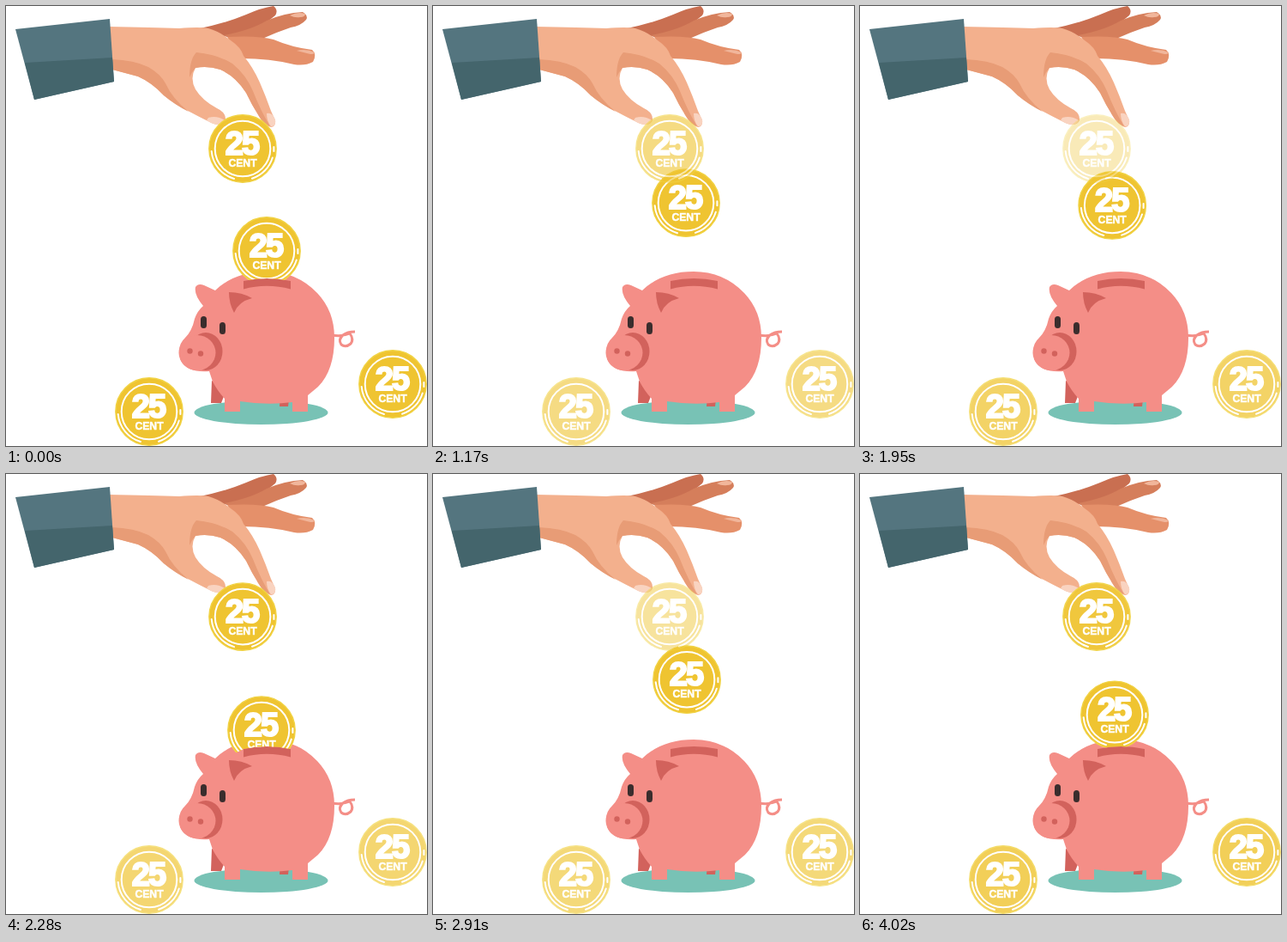
Write an HTML page that moves like this. It is 491 px wide and 512 px high and loops after 4050 ms.

```html
<!DOCTYPE html>
<html lang="en">
<head>
<meta charset="utf-8">
<title>Piggy bank savings</title>
<style>
  html, body { margin: 0; width: 100%; height: 100%; overflow: hidden; background: #fff; }
  svg { display: block; width: 491px; height: 512px; }
  text { font-family: "Liberation Sans", Arial, sans-serif; font-weight: bold; text-anchor: middle; fill: #fff; stroke: #fff; }
  .num { font-size: 38px; letter-spacing: -2px; stroke-width: 2.2px; }
  .unit { font-size: 12.2px; stroke-width: .5px; }
  .pink { fill: #f48e87; }
  .rose { fill: #d2625c; }
</style>
</head>
<body>
<svg viewBox="0 0 491 512">
  <defs>
    <g id="coin">
      <circle r="39.2" fill="#efc431" stroke="#f1d344" stroke-width="1.4"/>
      <g fill="none" stroke="#fff" stroke-width="2">
        <circle r="32.3"/>
        <path d="M-36.3 3A36.4 36.4 0 0 0 -10 35M11 34.7A36.4 36.4 0 0 0 34.8 10.5M36.4 3V-2" stroke-linecap="round"/>
      </g>
      <text class="num" x="-1" y="7">25</text>
      <text class="unit" y="20.8">CENT</text>
    </g>
    <clipPath id="aboveSlot">
      <path d="M0 0H491V330H345L332 320Q304 314 277 320L257 330H0Z"/>
    </clipPath>
  </defs>

  <!-- hand -->
  <path fill="#c96f51" d="M226 26Q256 20 280 10Q298 2 312 0Q318 5 314 11Q306 18 296 24L258 36Z"/>
  <path fill="#d57e5b" d="M254 34Q286 28 304 17Q325 8 346 7Q353 11 350 16Q344 23 332 25Q314 31 299 38L276 42Z"/>
  <path fill="#e5906a" d="M258 36Q294 34 312 39Q333 48 357 51Q363 56 358 65Q349 70 336 68Q308 61 274 61Z"/>
  <path fill="#f1b69b" d="M331 11Q340 6 349 9Q349 13 343 13Q337 14 331 11ZM339 52Q350 49 360 54Q360 56 355 56Z"/>
  <path fill="#f3b08d" d="M119 24Q172 25 202 26Q226 24 236 26Q250 30 262 40Q274 48 277 58Q288 71 296 89Q303 105 309 122L314 133Q315 140 309 141Q302 139 296 130Q287 116 280 101Q268 82 250 74Q235 69 221 72Q214 84 221 97Q229 110 246 119Q257 124 256 133Q253 140 242 137Q231 132 216 124Q197 115 184 104Q170 89 154 82L124 74Z"/>
  <path fill="#e89c76" d="M123 62Q150 63 166 71Q180 79 186 90Q194 108 213 123Q197 115 184 104Q170 89 154 82L124 74Z"/>
  <path fill="#e89c76" d="M214 83Q214 62 222 54Q246 56 264 67Q280 80 288 99Q297 122 308 140Q300 137 295 128Q286 114 280 101Q268 82 250 74Q235 69 221 72Q217 76 214 83Z"/>
  <path fill="#f9d3c0" d="M236 130Q246 127 255 133Q254 139 245 138Q239 137 234 133ZM304 125Q310 123 314 132Q315 141 309 140Q304 134 304 125Z"/>
  <path fill="#54757f" d="M11 27L121 15L126 88L33 109Z"/>
  <path fill="#44656c" d="M22 66L124 60L126 88L33 109Z"/>

  <!-- pig -->
  <ellipse cx="297.5" cy="473" rx="78" ry="14" fill="#78c2b5"/>
  <path class="rose" d="M240 436L258 444L251 462H239ZM320 450H331L329 466H319Z"/>
  <path fill="none" stroke="#f48e87" stroke-width="3" d="M380 383Q392 385 401 381Q406 388 402 393Q396 398 391 394Q387 388 393 383Q398 379 407 379"/>
  <path class="pink" d="M244 331Q267 309 304 309Q339 309 363 334Q383 355 383 386Q383 424 364 443L352 453V472H334V461Q305 465 273 460V472H255V457Q246 447 241 437Q239 431 237 425Q212 427 204 413Q198 396 209 386Q217 378 220 364Q223 355 230 349Q219 336 221 327Q224 322 231 325Z"/>
  <ellipse class="rose" cx="233" cy="402" rx="19.5" ry="22"/>
  <ellipse class="pink" cx="223" cy="403.5" rx="21.5" ry="20.5"/>
  <g class="rose">
    <circle cx="214.5" cy="401.5" r="3.2"/><circle cx="227" cy="404.5" r="3.2"/>
    <path d="M260 333Q275 333 287 340Q271 344 266 357Q260 346 260 333Z"/>
    <path d="M277 320Q304 314 332 320V329.5Q304 322 277 329.5Z"/>
  </g>
  <g fill="#3a2d2d">
    <rect x="227" y="361" width="7" height="14" rx="3.5"/>
    <rect x="249" y="368" width="7" height="14" rx="3.5"/>
  </g>

  <g id="sides">
    <use href="#coin" x="167" y="472"/>
    <use href="#coin" x="451" y="440"/>
  </g>
  <g id="drops" clip-path="url(#aboveSlot)"></g>
</svg>
<script>
const LOOP = 4050, FADE = 450;

// Each stop is [time, value, ...].
const fall = [
  [480, 276, 166], [720, 284, 192], [750, 285, 196], [1110, 296, 239],
  [1320, 297, 280], [1380, 298, 298], [1620, 298, 324], [1635, 298, 326]
];
const firstFall = [[480, 276, 166], [780, 287, 194], [1170, 295, 229], [1620, 298, 324], [1635, 298, 327]];
const sink = [[30, 304, 285], [360, 304, 366]];
const glow = [[0, 1], [1170, .6], [1620, .8], [2280, .69], [2910, .65], [3450, .76], [4020, .81], [4050, .82]];

const drops = [
  { born: 0, path: sink, solid: true },
  { born: 0, path: firstFall, solid: true },
  ...[900, 1800, 2700, 3600].map(born => ({ born, path: fall }))
];

function at(stops, t) {
  const i = stops.findIndex(s => s[0] > t);
  if (i === 0) return stops[0].slice(1);
  if (i < 0) return stops[stops.length - 1].slice(1);
  const a = stops[i - 1], b = stops[i], k = (t - a[0]) / (b[0] - a[0]);
  return a.slice(1).map((v, j) => v + (b[j + 1] - v) * k);
}

const sides = document.getElementById("sides");
const layer = document.getElementById("drops");
for (const drop of drops) {
  drop.el = document.createElementNS("http://www.w3.org/2000/svg", "use");
  drop.el.setAttribute("href", "#coin");
  layer.append(drop.el);
}

function draw(t) {
  // The resting coins share one slow pulse.
  sides.setAttribute("opacity", at(glow, t)[0]);
  for (const { el, born, path, solid } of drops) {
    const age = t - born;
    const live = age >= 0 && age < path[path.length - 1][0];
    const [x, y] = at(path, age);
    el.setAttribute("transform", `translate(${x} ${y})`);
    el.setAttribute("opacity", !live ? 0 : solid ? 1 : Math.min(1, age / FADE));
  }
}

const start = performance.now();
function tick() {
  draw((performance.now() - start) % LOOP);
  requestAnimationFrame(tick);
}
draw(0);
requestAnimationFrame(tick);
</script>
</body>
</html>
```
